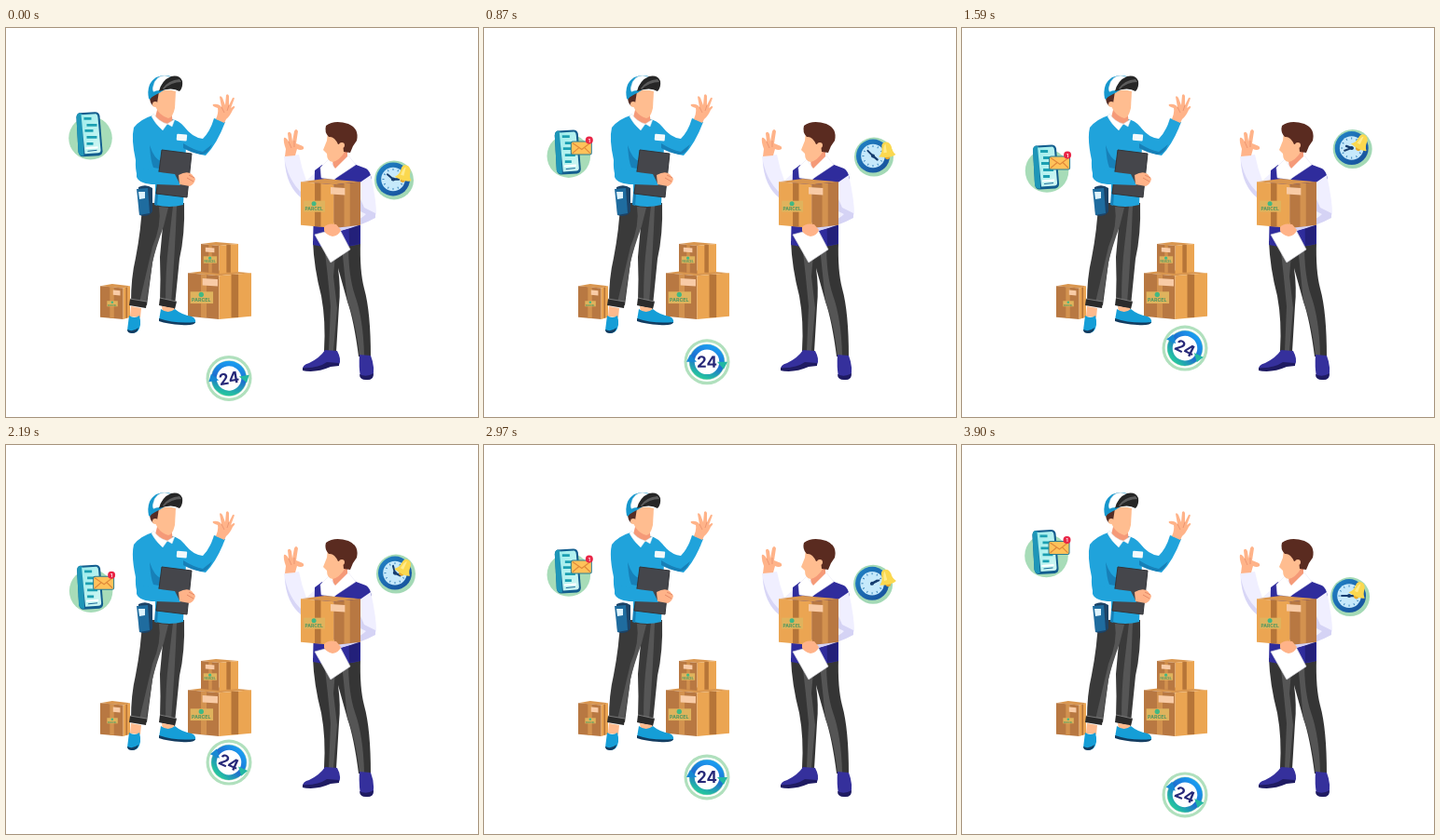
An HTML page for the animation above (3.93 s loop, 506x418 px).

```html
<!DOCTYPE html>
<html lang="en">
<head>
<meta charset="utf-8">
<title>Parcel delivery</title>
<style>
html, body { margin: 0; width: 100%; height: 100%; overflow: hidden; background: #fff; }
svg { display: block; width: 100vw; height: 100vh; }
text { font-family: Inter, Roboto, sans-serif; font-weight: 700; text-anchor: middle; }
</style>
</head>
<body>
<svg viewBox="0 0 506 418">
  <defs>
    <linearGradient id="ring" x1="0.7" y1="0" x2="0.3" y2="1">
      <stop offset="0" stop-color="#1b9bf0"/><stop offset=".5" stop-color="#1e6fd0"/><stop offset="1" stop-color="#25c3a0"/>
    </linearGradient>
    <linearGradient id="screen" x1="0" y1="0" x2="1" y2="1">
      <stop offset="0" stop-color="#9cecec"/><stop offset="1" stop-color="#d3f8f3"/>
    </linearGradient>
    <linearGradient id="dial" x1="0" y1="0" x2="1" y2="1">
      <stop offset="0" stop-color="#2185c8"/><stop offset="1" stop-color="#174d98"/>
    </linearGradient>
  </defs>

  <g id="parcels"></g>

  <g id="courier">
    <path fill="#3a3a3a" d="M146 188L191 188Q192 222 186 248L181 298L165 294Q166 270 165 246L168 213Q159 240 157 252L151 298L134 295Q134 268 139 247Q145 216 146 188Z"/>
    <path fill="#565656" d="M164 192Q167 212 157 235L143 295L150 298L157 252Q160 238 169 213L174 193ZM179 191L183 191Q181 245 177 296L171 295Q171 260 174 235Z"/>
    <path fill="#2b2b2b" d="M133 291L151 294L150 301L132 298ZM165 290L183 294L181 302L164 298Z"/>
    <path fill="none" stroke="#8a8a8a" stroke-width=".8" d="M133 291L151 294M165 290L183 294"/>
    <path fill="#ffba8d" d="M134 299L145 301L144 311L133 310ZM167 299L180 301L182 306L168 306Z"/>
    <path fill="#159ed7" d="M132 309Q138 313 143 309Q146 320 141 326Q135 330 130 325ZM166 302Q174 308 181 302Q188 308 199 310Q204 312 203 317Q184 320 164 314Z"/>
    <path fill="#133c60" d="M130 324Q136 327 142 322Q141 328 135 328Q130 328 130 324ZM164 312Q181 318 203 316Q202 320 188 319Q173 318 164 315Z"/>
    <path fill="#20a3db" d="M157 94Q144 98 137 107Q134 119 139 142Q138 162 147 165L160 166L160 190Q175 194 190 190L193 127Q204 136 214 137Q226 125 235 101L223 97Q219 111 211 119Q200 118 191 106Q185 99 178 98Q166 108 157 94Z"/>
    <path fill="#1780b8" d="M154 126Q155 143 158 150L164 151L161 164L145 164Q159 170 164 167L160 177L159 190L162 191L166 143Q159 141 154 126ZM190 124Q201 131 211 133L221 125Q216 137 209 136Q198 134 190 129Z"/>
    <path fill="#f59a78" d="M162 88L177 89L179 102Q168 108 160 96Z"/>
    <path fill="#ffbd90" d="M160 69Q172 65 182 68L181 86Q179 96 174 97Q164 94 160 84Z"/>
    <path fill="#552d25" d="M154 74L164 68L162 81L158 84Q154 81 154 74Z"/>
    <circle cx="160" cy="82" r="3" fill="#ffbd90"/>
    <path fill="#fff" stroke="#d9e6ee" stroke-width=".5" d="M158 92Q164 101 173 103L181 98L178 106L173 103L168 110Q160 103 156 95Z"/>
    <path fill="#1697cd" d="M153 76Q150 60 161 53Q171 49 179 53L169 67Z"/>
    <path fill="#fff" stroke="#b7d7e5" stroke-width=".5" d="M158 62Q160 52 170 51L178 53Q167 57 165 67L159 70Q156 66 158 62Z"/>
    <path fill="#1697cd" d="M153 75Q156 67 165 67L166 69Q158 71 154 77Z"/>
    <path fill="#262626" d="M164 68Q167 56 177 52Q186 50 189 57Q190 64 186 68Q178 63 164 68Z"/>
    <path fill="#5b5b5b" d="M168 65Q174 56 186 55L188 58Q177 58 169 66Z"/>
    <rect x="183" y="114" width="11" height="7" rx="1" fill="#f4f9fb" transform="rotate(5 188 117)"/>
    <path fill="#45464b" stroke="#333438" d="M167 131L199 135L194 182L161 178Z"/>
    <path fill="#20a3db" d="M140 149Q155 154 181 157L187 169L161 168Q143 168 140 160Z"/>
    <path fill="#ffb389" d="M185 158Q194 153 199 157L203 162Q202 168 197 170L186 168Z"/>
    <path fill="none" stroke="#e68a68" d="M196 158L202 161M194 161L201 165"/>
    <path fill="#1c4367" d="M142 171Q150 167 157 172L157 197Q153 204 143 201Z"/>
    <path fill="#1f6c9f" d="M140 173L152 172L154 199L143 201Z"/>
    <path fill="#def3fc" d="M142 176L149 176L149 183L143 184Z"/>
    <path fill="#ffb389" d="M225 98Q228 91 227 86Q220 84 222 82Q228 81 231 85L229 74Q230 72 232 75L235 83L236 72Q238 70 239 73L239 83L243 75Q246 74 244 78L241 86L244 84Q247 84 243 88Q240 95 236 98L234 102Z"/>
    <path fill="none" stroke="#e68a68" stroke-width=".7" d="M231 85L234 91M239 83L237 89"/>
  </g>

  <g id="customer">
    <path fill="#353535" d="M329 229L380 229Q379 261 384 280Q391 305 391 354L378 353Q373 314 366 294L356 258Q359 280 357 298L354 348L341 347Q343 315 338 288Q330 257 329 229Z"/>
    <path fill="#555" d="M341 232L354 232L351 267L355 301L351 347L346 347L348 299Q345 266 341 232ZM360 235L367 232Q367 266 374 287Q383 312 384 352L379 352Q375 316 366 294Z"/>
    <path fill="#35309c" d="M342 346L355 347Q360 356 357 362L346 362Q331 369 318 368Q317 362 325 360Q337 354 342 346ZM379 351L391 352Q396 365 393 376Q386 380 380 375Q378 364 379 351Z"/>
    <path fill="#1f1b62" d="M318 365Q334 366 344 359L357 360L357 363L348 364Q332 371 318 368ZM379 372Q386 376 394 371Q394 379 386 378Q379 378 379 372Z"/>
    <path fill="#f0efff" d="M298 138L314 136Q317 151 322 164L342 146L375 145L367 184L331 187L318 183Q301 174 298 138Z"/>
    <path fill="#d8d6f6" d="M299 143Q304 168 322 181L317 183Q300 169 299 143Z"/>
    <path fill="#2f2c9c" d="M339 147L331 153L329 233Q352 239 380 232L380 185L392 162Q390 153 386 151L370 145L351 164Z"/>
    <path fill="#23207a" d="M367 183L380 182L379 232L368 234Z"/>
    <path fill="#f0efff" d="M378 167L391 158Q397 185 397 200Q392 208 355 219L349 210L378 200Z"/>
    <path fill="#d5d3f5" d="M380 184L384 193L396 199L396 204Q382 212 355 219L354 215Q378 208 386 200L380 197Z"/>
    <path fill="#fff" stroke="#e4e2f3" stroke-width=".5" d="M346 141L352 150L367 137L375 147L351 163L338 161L337 150Z"/>
    <path fill="#f59a78" d="M352 136L366 128L366 138L353 151Q348 146 352 136Z"/>
    <path fill="#ffbd90" d="M345 111L363 114L364 132Q357 143 350 144Q344 143 344 135L340 131L344 121Z"/>
    <path fill="#5a2b20" d="M343 105Q352 98 367 103Q379 108 376 121Q371 127 369 134L362 133L361 124L356 125Q352 116 346 117Q341 112 343 105Z"/>
    <circle cx="360" cy="126" r="3" fill="#ffbd90"/>
    <path fill="#ffb389" d="M299 138L300 130Q297 122 298 118Q300 117 303 122L302 113Q304 110 306 114L307 122L309 111Q311 107 313 111L311 124L316 126Q320 127 319 130Q316 132 312 130L310 137Z"/>
    <path fill="none" stroke="#e68a68" stroke-width=".7" d="M303 122L306 129M309 121L309 128"/>
    <path fill="#fff" stroke="#d8d8df" stroke-width=".7" d="M331 222L357 215L369 238L348 252Z"/>
  </g>
  <g id="held"></g>
  <path fill="#ffb389" d="M341 214Q345 209 354 211L359 217Q357 223 350 224Q343 222 341 218Z"/>

  <g id="phone">
    <circle r="23.3" fill="#a7dcb8"/>
    <g>
      <path fill="#135e8f" d="M-12 -27Q-15 -26 -15 -22L-13 15Q-12 20 -8 20L9 19Q13 18 13 14L10 -24Q9 -28 5 -28Z"/>
      <path fill="#1e96b8" d="M-12 -27L-9 -26L-7 19L-9 19Q-12 19 -13 15L-15 -22Q-15 -26 -12 -27Z"/>
      <path fill="url(#screen)" d="M-10 -25L6 -26Q8 -25 8 -22L11 13Q11 16 8 16L-6 17Z"/>
      <path fill="none" stroke="#1ba0b2" stroke-width="2.8" d="M-7 -21L1 -21M-4 -14L7 -14M-6 -8L3 -8M-4 -1L7 -1M-4 6L3 6"/>
      <path fill="none" stroke="#fff" stroke-width="2" d="M-5 11L8 10"/>
      <path fill="none" stroke="#1c6a9a" d="M-3 14L7 13"/>
    </g>
    <g id="mail">
      <rect x="-11" y="-7" width="23" height="15" rx="2.5" fill="#2a7c93"/>
      <rect x="-10" y="-6" width="21" height="13" rx="1.5" fill="#ffc25a"/>
      <path fill="none" stroke="#e08a3a" stroke-width="1.2" d="M-9 -5L1 2L10 -5M-9 6L-2 0M10 6L4 0"/>
      <circle cx="9" cy="-8" r="4" fill="#e92546"/>
      <text x="9" y="-6" font-size="5" fill="#fff">1</text>
    </g>
  </g>

  <g id="clock">
    <circle r="21" fill="#a3d9b5"/>
    <circle cx="-1" cy="-1" r="18" fill="url(#dial)"/>
    <circle cx="-1" cy="-1" r="12.8" fill="#c6e9fb"/>
    <g id="ticks" stroke="#3a86bb" stroke-width="1"></g>
    <path id="hour" d="M0 1V-6" stroke="#173e70" stroke-width="2.4" stroke-linecap="round" fill="none"/>
    <path id="minute" d="M0 1V-8" stroke="#173e70" stroke-width="2" stroke-linecap="round" fill="none"/>
    <circle cx="-1" cy="-1" r="2" fill="#173e70"/>
    <g id="bell">
      <circle cy="6" r="2.4" fill="#e9a92c"/>
      <path fill="#fbd84f" d="M-8 5Q-4 2 -4 -3Q-4 -8 0 -8Q4 -8 5 -3Q5 2 8 5Q3 8 -8 5Z"/>
      <path fill="#ffeb8c" d="M-3 2Q-2 -6 0 -6L0 2Z"/>
    </g>
  </g>

  <g id="service">
    <circle r="24.5" fill="#b0e0bd"/>
    <circle r="20.3" fill="none" stroke="#fff" stroke-width="2"/>
    <g id="wheel">
      <circle r="16" fill="#fff" stroke="url(#ring)" stroke-width="5.5"/>
      <path fill="#22b7a2" d="M11 0L22 0L18 8Z"/>
      <path fill="#1689d3" d="M-11 0L-22 0L-18 -8Z"/>
      <text y="6" font-size="17" fill="#262878">24</text>
    </g>
  </g>
</svg>
<script>
const LOOP = 3930;
const LIGHT = { face: "#eba552", tape: "#b67538" };
const DARK = { face: "#b87842", tape: "#d3924f" };
const el = id => document.getElementById(id);

// A carton seen from a corner; edge is where its two sides meet, slip and tag are label offsets.
function carton(x, y, w, h, edge, left, right, slip, tag) {
  const s = w * edge, d = h * .06, r = w - s;
  const band = (a, b, fill) => `<path fill="${fill}" d="M${a} ${d * 1.5}H${b}V${h - d * .6}H${a}Z"/>`;
  return `<g transform="translate(${x} ${y})">
    <path fill="#d9964f" d="M0 ${d}L${w * .4} 0L${w} ${d}L${s} ${d * 2}Z"/>
    <path fill="${left.face}" d="M0 ${d}L${s} ${d * 2}V${h}L0 ${h - d}Z"/>
    <path fill="${right.face}" d="M${s} ${d * 2}L${w} ${d}V${h - d}L${s} ${h}Z"/>
    ${band(s * .42, s * .6, left.tape)}${band(s + r * .38, s + r * .6, right.tape)}
    <path fill="#f8cba6" d="M${w * slip} ${h * .17}l${w * .24} ${h * .02}v${h * .14}l${-w * .24} ${-h * .02}Z"/>
    <g transform="translate(${w * tag} ${h * .56}) scale(${w / 64})">
      <rect x="-11" y="-6" width="23" height="12" fill="#dfb35d"/>
      <circle cy="-3" r="2.5" fill="#42b883"/>
      <text y="4.5" font-size="5" fill="#4e9760">PARCEL</text>
    </g></g>`;
}

el("parcels").innerHTML =
  carton(101, 275, 32, 38, .77, DARK, LIGHT, .43, .4) +
  carton(195, 260, 68, 53, .49, DARK, LIGHT, .23, .21) +
  carton(209, 230, 40, 34, .49, DARK, LIGHT, .12, .24);
el("held").innerHTML = carton(316, 162, 64, 53, .56, LIGHT, DARK, .5, .22);
el("ticks").innerHTML = Array.from({ length: 12 }, (_, i) =>
  `<path d="M0 -11.5V-9.5" transform="translate(-1 -1) rotate(${i * 30})"/>`).join("");

// Triangle wave from 0 to 1 and back, cresting at the given share of the loop.
const rise = (u, crest) => u < crest ? u / crest : (1 - u) / (1 - crest);

function track(keys, t) {
  const i = keys.findIndex(k => k[0] > t);
  if (i < 0) return keys[keys.length - 1][1];
  const [a, b] = [keys[i - 1], keys[i]];
  return a[1] + (b[1] - a[1]) * (t - a[0]) / (b[0] - a[0]);
}

const minuteAngle = [[0, -50], [870, -45], [1590, 250], [2190, 345], [2970, 425], [3450, 630], [3900, 630]];
const hourAngle = [[0, 90], [870, 130], [1590, 290], [2190, 475], [2970, 420], [3450, 360], [3900, 450]];
const bellX = [[0, 11], [870, 13.5], [1590, 9], [2190, 9], [2970, 14.5], [3450, 13], [3900, 9]];
const bellTilt = [[0, 14], [870, -8], [1590, 25], [2190, 25], [2970, -15], [3450, 0], [3900, 20]];
const wheelTilt = [[0, -10], [870, 0], [1590, 26], [2190, 24], [2970, 0], [3450, 0], [3900, 22]];

const place = (id, x, y, extra = "") => el(id).setAttribute("transform", `translate(${x} ${y}) ${extra}`);

function draw(t) {
  const u = t / LOOP, half = rise(u, .5), third = rise(u, 1 / 3);
  place("phone", 90.5 + half * .7, 118.3 + half * 43.5);
  place("mail", 13, -9, `scale(${Math.min(1, t / 400)})`);
  place("clock", 416 + third * 3, 163.5 - third * 37.5);
  place("minute", -1, -1, `rotate(${track(minuteAngle, t)})`);
  place("hour", -1, -1, `rotate(${track(hourAngle, t)})`);
  place("bell", track(bellX, t), -7, `rotate(${track(bellTilt, t)}) scale(1.15)`);
  place("service", 239, 376.5 - half * 40);
  place("wheel", 0, 0, `rotate(${track(wheelTilt, t)})`);
}

const start = performance.now();
function tick(now) {
  draw(Math.max(0, now - start) % LOOP);
  requestAnimationFrame(tick);
}
draw(0);
requestAnimationFrame(tick);
</script>
</body>
</html>
```
